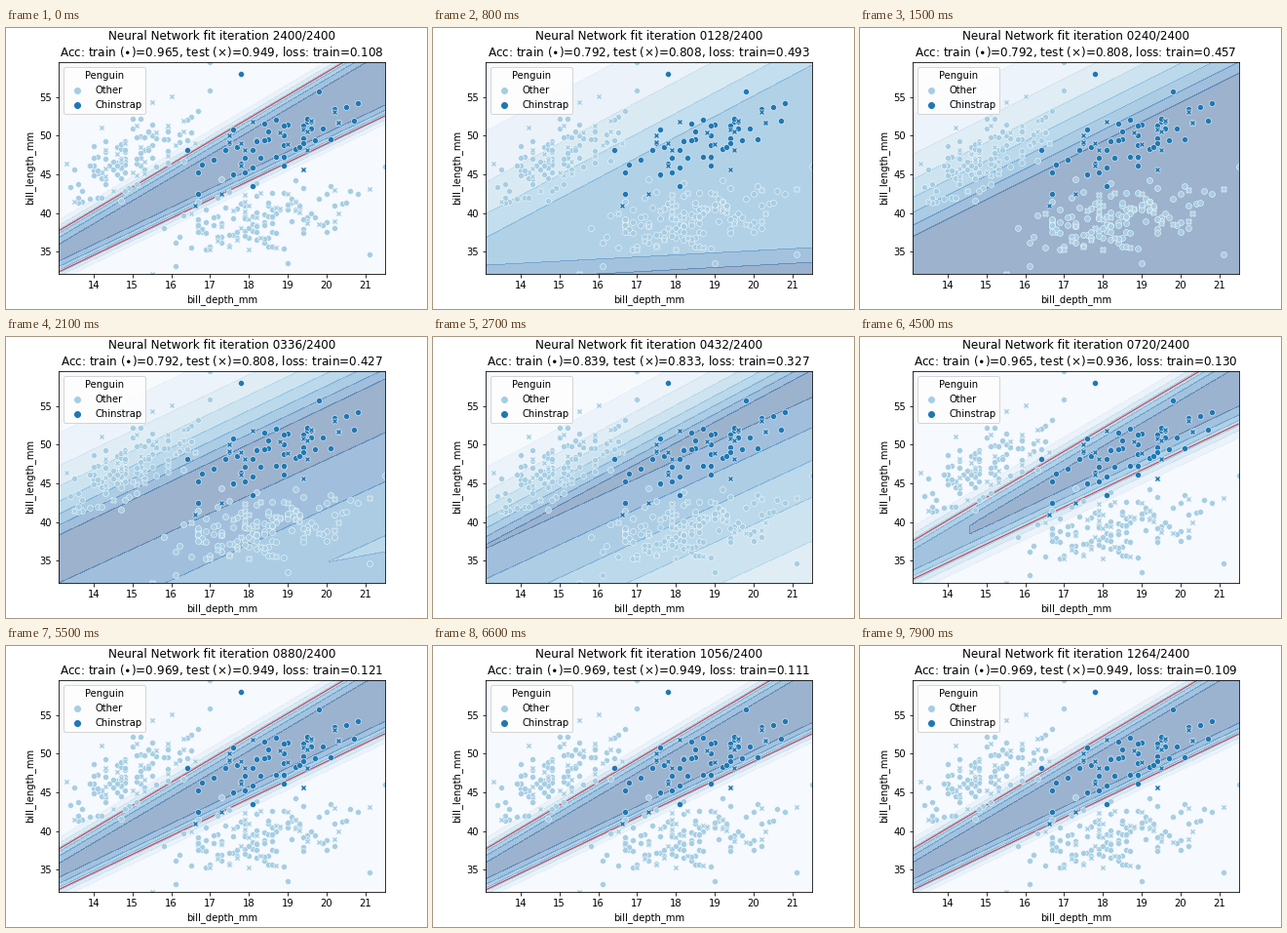
A matplotlib script for the animation above (8000 ms loop, 432x288 px).

```python
import numpy as np
import matplotlib.pyplot as plt
from matplotlib.animation import FuncAnimation

STEPS, FRAMES = 2400, 80
X0, X1, Y0, Y1 = 13.1, 21.5, 32.1, 59.6
LIGHT, DARK = "#a6cee3", "#1f78b4"
TOP, HEIGHT = 34.56, 217.44  # plot area in stage pixels

rng = np.random.default_rng(8)


def cluster(n, depth, length, sd, corr):
    """Gaussian cloud of (depth, length) without its far tail."""
    a, b = rng.normal(size=(2, 3 * n))
    keep = np.hypot(a, b) < 2.2
    a, b = a[keep][:n], b[keep][:n]
    b = corr * a + np.sqrt(1 - corr ** 2) * b
    return np.round(np.column_stack([depth + sd[0] * a,
                                     length + sd[1] * b]), 1)


adelie = cluster(138, 18.3, 38.8, (1.2, 2.6), .35)
gentoo = cluster(112, 15.0, 47.5, (.97, 2.9), .65)
chinstrap = cluster(58, 18.45, 48.9, (1.05, 2.7), .75)

# A few outlying birds of each kind
far_other = [(17, 59.6), (17, 55.9), (21.5, 46), (20.8, 42.5), (21.1, 34.6),
             (19, 33.5), (16.1, 33.1), (17.3, 44.4), (14.7, 41.6)]
far_other_test = [(16, 55.1), (15.5, 54.3), (14.2, 51.1), (21.1, 43.1),
                  (15.5, 32.1)]
far_chin = [(17.8, 58), (19.8, 55.8), (20.8, 54.2), (18.1, 43.5), (16.4, 48.1),
            (16.7, 42.5), (20.7, 52)]
far_chin_test = [(16.6, 40.9), (17.3, 42.5), (19.4, 45.6), (20.3, 51.7)]

# Decision surface poses: zero line at the left and right edge and pixels per
# logit for the upper, lower and corner sheet, then the cap at both edges
EARLY = np.array([312, 135, 70, 500, 400, 150, 309, 291, 60, -1.15, -1.15])
FOLD = np.array([231, 71, 45, 116, -38, 220, 445, 385, 150, -.5, -.5])
RIDGE = np.array([216, 18, 20, 238, 82, 27, 900, 900, 150, 1, 2.2])
FINAL = np.array([208, 10, 6.3, 250, 90, 5, 900, 900, 150, 3.3, 3.3])
SETTLE = np.where(np.arange(11) < 9, 100, 300)  # iterations


def ease(it, start, end):
    t = np.clip((it - start) / (end - start), 0, 1)
    return t * t * (3 - 2 * t)


def pose(it):
    p = EARLY + (FOLD - EARLY) * ease(it, 128, 336)
    p = p + (RIDGE - p) * ease(it, 336, 528)
    return p + (FINAL - p) * (1 - np.exp(-max(it - 528, 0) / SETTLE))


gx, gy = np.meshgrid(np.linspace(X0, X1, 160), np.linspace(Y0, Y1, 140))
u = (gx - X0) / (X1 - X0)
v = TOP + (Y1 - gy) / (Y1 - Y0) * HEIGHT


def mix(a, b):
    return a + (b - a) * u


def sheet(left, right, scale):
    return (v - mix(left, right)) / scale


def probability(it):
    p = pose(it)
    upper, lower, corner = sheet(*p[:3]), -sheet(*p[3:6]), sheet(*p[6:9])
    z = np.minimum(mix(*p[9:]), lower)
    z = np.minimum(upper, np.maximum(z, corner))
    z = z * min(1, .4 + .6 * it / 128)  # small weights at first
    return 1 / (1 + np.exp(-z))


def scores(it):
    train = np.interp(it, [400, 520, 720, 1056, 1264, STEPS],
                      [.792, .965, .965, .969, .969, .965])
    test = np.interp(it, [400, 528, 720, 850], [.808, .910, .936, .949])
    loss = np.interp(it, [16, 128, 336, 528, 720, 1056, 1264, STEPS],
                     [.602, .493, .427, .226, .130, .111, .109, .108])
    # accuracies are fractions of 255 and 78 birds
    return round(train * 255) / 255, round(test * 78) / 78, loss


fig, ax = plt.subplots(figsize=(6, 4), dpi=72, facecolor="white")
fig.subplots_adjust(left=.125, right=.9, bottom=.125, top=.88)


def scatter(pts, color, marker):
    ax.scatter(pts[:, 0], pts[:, 1], s=36, c=color, marker=marker,
               edgecolors="white", linewidths=.48, zorder=2)


for cloud, far, far_test, color in [
        (np.vstack([adelie, gentoo]), far_other, far_other_test, LIGHT),
        (chinstrap, far_chin, far_chin_test, DARK)]:
    is_test = rng.random(len(cloud)) < .22
    scatter(np.vstack([cloud[~is_test], far]), color, "o")
    scatter(np.vstack([cloud[is_test], far_test]), color, "X")

ax.set(xlim=(X0, X1), ylim=(Y0, Y1), xlabel="bill_depth_mm",
       ylabel="bill_length_mm", xticks=range(14, 22), yticks=range(35, 60, 5))
dots = [ax.scatter([], [], s=36, color=c) for c in (LIGHT, DARK)]
ax.legend(dots, ["Other", "Chinstrap"], title="Penguin", loc="upper left")
title = ax.set_title(" \n ")
layers = []


def draw(i):
    it = 16 * i if i else STEPS
    while layers:
        layers.pop().remove()
    p = probability(it)
    layers.append(ax.contourf(gx, gy, p, cmap="Blues", alpha=.4, zorder=1))
    if p.max() > .5:
        layers.append(ax.contour(gx, gy, p, levels=[.5], colors="#d0182a",
                                 linewidths=1.1, alpha=.8, zorder=1.5))
    train, test, loss = scores(it)
    title.set_text(f"Neural Network fit iteration {it:04d}/{STEPS}\n"
                   f"Acc: train ($\\bullet$)={train:.3f}, "
                   f"test ($\\times$)={test:.3f}, loss: train={loss:.3f}")
    return [title]


anim = FuncAnimation(fig, draw, frames=FRAMES, interval=100, repeat=True,
                     repeat_delay=0, blit=False)
plt.show()
```
